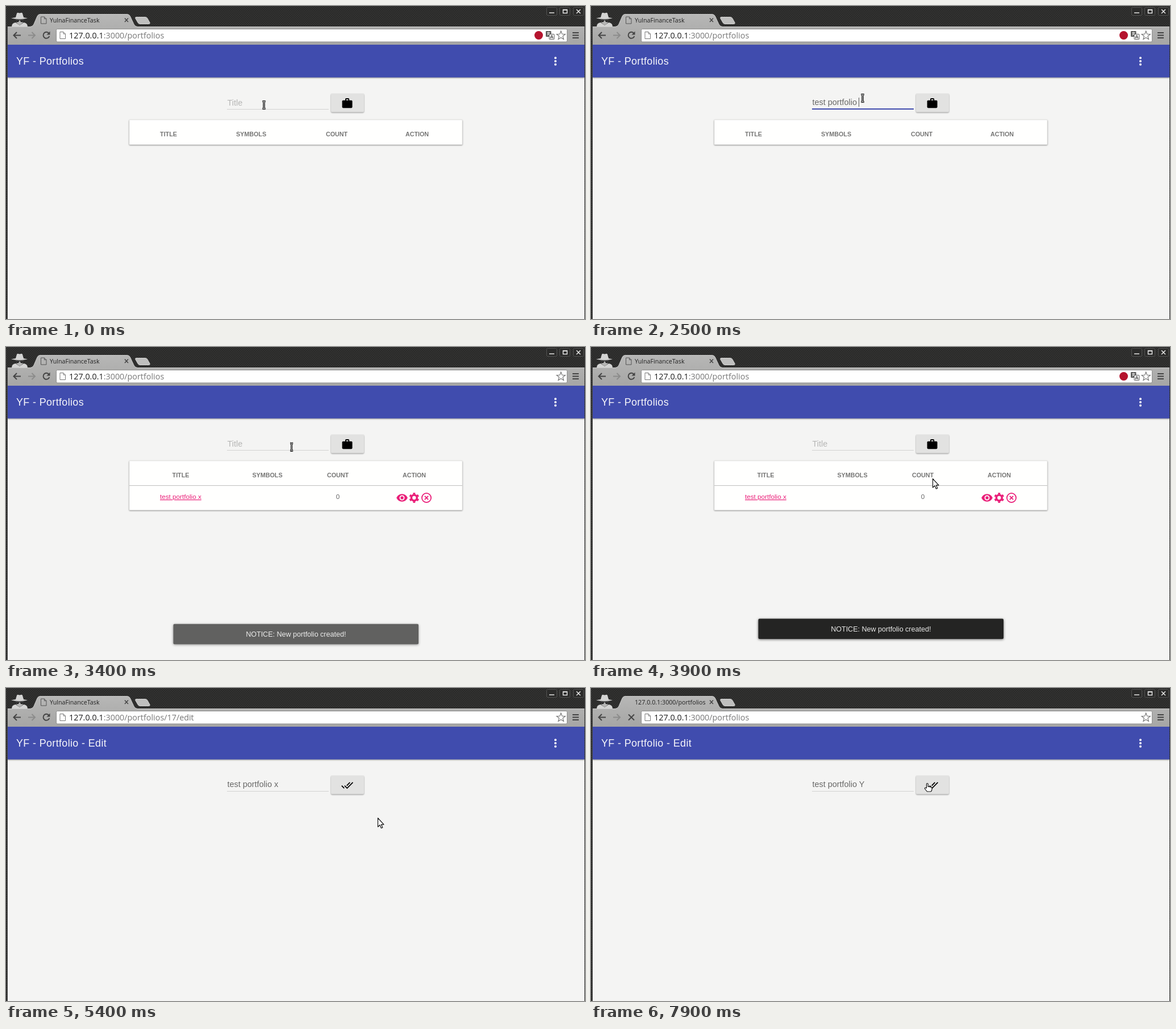
These frames come from a looping animation (1019x550 px, 8000 ms). An HTML page:

```html
<!DOCTYPE html>
<html lang="en">
<head>
<meta charset="utf-8">
<title>Portfolios</title>
<style>
  html, body { margin: 0; width: 100%; height: 100%; overflow: hidden; background: #f4f4f3; }
  svg { display: block; width: 100%; height: 100%; }
  text { font-family: "Liberation Sans", Arial, sans-serif; white-space: pre; }
  .ui { font-family: "Open Sans", "Noto Sans", sans-serif; }
  .th { font-size: 10.76px; font-weight: bold; fill: #757574; text-anchor: middle; }
  .card { filter: drop-shadow(0 1px 1px #0006); }
  .line { fill: none; stroke: #444; stroke-width: 2; }
  .pink { fill: #ea2079; stroke: #ea2079; }
</style>
</head>
<body>
<svg viewBox="0 0 1019 550" preserveAspectRatio="none">
  <defs>
    <pattern id="weave" width="4" height="4" patternUnits="userSpaceOnUse">
      <path fill="#2b2b2a" d="M0 0h4v4H0z"/>
      <path fill="#383837" d="M0 0h2v1H0zM2 2h2v1H2z"/>
    </pattern>
    <linearGradient id="metal" x2="0" y2="1">
      <stop stop-color="#b7b7b6"/><stop offset="1" stop-color="#a6a6a5"/>
    </linearGradient>
    <linearGradient id="fade" gradientUnits="userSpaceOnUse" x1="188" x2="203" y1="0" y2="0">
      <stop stop-color="#222"/><stop offset="1" stop-color="#222" stop-opacity="0"/>
    </linearGradient>
    <path id="doc" d="M.5.5h6l3.5 3.5v8.5H.5zM6.5.5V4H10" fill="none" stroke-width="1"/>
    <clipPath id="page"><path d="M3 68h1015v482H3z"/></clipPath>
  </defs>

  <!-- window frame -->
  <path fill="url(#weave)" d="M0 0h1019v550H0z"/>
  <path fill="#4a4a49" d="M2 36h1v514H2z"/>
  <g fill="#2b2b2a" stroke="#545453">
    <rect x="951.5" y="2.5" width="18" height="14" rx="2"/>
    <rect x="974.5" y="2.5" width="18" height="14" rx="2"/>
    <rect x="998.5" y="2.5" width="18" height="14" rx="2"/>
  </g>
  <path d="M956 12h9M980.500 6.500h7v6h-7zM980 7h8M1004 6l7 7M1011 6l-7 7" fill="none" stroke="#e6e6e5" stroke-width="1.500"/>

  <!-- private-mode badge -->
  <g fill="#d4d4d3">
    <path d="M17 20l2-7q1-2 3-1l2 .6 2-.6q2-1 3 1l2 7z"/>
    <path d="M9 21.500q15-4 29 0q-14 3.500-29 0z"/>
    <path d="M10 36q0-6 7-7l7 5 7-5q7 1 7 7z"/>
    <path d="M17 24h14l-2 6-5 4-5-4z" fill="#b5b5b4"/>
  </g>
  <path d="M16.500 24.500h6.500v2q-3 4-6-.5zM25 24.500h6.500l-.5 1.500q-3 4.500-6 .5zM22 24.500h4v1h-4z" fill="#222"/>

  <!-- tabs and toolbar -->
  <path d="M3 68V36H43Q47 36 49 32L55 18Q56.500 14.500 60 14.500H213Q217 14.500 218.500 18L225 32Q227 36 231 36H1018V68z" fill="url(#metal)"/>
  <path d="M3 36.500H43Q47 36 49 32L55 18Q56.500 14.500 60 14.500H213Q217 14.500 218.500 18L225 32Q227 36 231 36.500H1018" fill="none" stroke="#cacac9"/>
  <path d="M229 19.500h16q3 0 4 2.500l4 7q1 2.500-2 2.500h-15q-3 0-4-2.500l-4-7q-1-2.500 1-2.500z" fill="#bfbfbe" stroke="#d3d3d2"/>
  <path d="M209 21.500l6 6.500M215 21.500l-6 6.500" class="line" style="stroke-width:1.500"/>
  <use id="favicon" href="#doc" x="61" y="18.500" stroke="#555"/>
  <text id="tabTitle" class="ui" x="77" y="29" font-size="10.7"></text>
  <g class="line">
    <path d="M26 51.500H14M19 46l-5.500 5.500L19 57"/>
    <path d="M39 51.500h12M45.500 46l5.500 5.500L45.500 57" stroke="#8c8c8b"/>
    <g id="reload"><path d="M75.500 48A5.500 5.500 0 1 0 76.300 53"/><path d="M77.500 44.500v6h-6z" fill="#444" stroke="none"/></g>
    <path id="stop" d="M66 46.500l10 10M76 46.500l-10 10"/>
    <path d="M997 47h11M997 51.500h11M997 56h11"/>
  </g>
  <rect x="88.500" y="40.500" width="899" height="22.500" rx="2" fill="#fff" stroke="#8d8d8c"/>
  <use href="#doc" x="94.500" y="45" stroke="#777"/>
  <text class="ui" x="111" y="56.500" font-size="14.350" fill="#777"><tspan fill="#1c1c1c">127.0.0.1</tspan><tspan id="path"></tspan></text>
  <g id="extensions">
    <circle cx="937.500" cy="51.500" r="7.500" fill="#b5142e"/>
    <rect x="950" y="44" width="9.500" height="10" rx="1" fill="#595958"/>
    <path d="M952 47h5.500M954.700 45.500V47M956.500 47q-1 3-4.500 4.500M953 47.500q1 3 4 4" fill="none" stroke="#fff"/>
    <rect x="956" y="49.500" width="9" height="9" rx="1" fill="#eee" stroke="#666"/>
    <path d="M958 57l2.500-6 2.500 6M959 55h3" fill="none" stroke="#444"/>
  </g>
  <path id="star" fill="#fff" stroke="#777" stroke-width="1.200"/>

  <!-- page -->
  <g clip-path="url(#page)">
    <path fill="#f4f4f3" d="M3 68h1015v482H3z"/>
    <path fill="#404cae" d="M3 68h1015v57.500H3z" class="card"/>
    <text id="heading" x="18" y="103" font-size="17.940" letter-spacing=".36" fill="#f6f6fa"></text>
    <g fill="#fff"><circle cx="967" cy="91.300" r="2"/><circle cx="967" cy="97" r="2"/><circle cx="967" cy="102.700" r="2"/></g>

    <path d="M389 181.500h179" stroke="#d2d2d1"/>
    <rect id="focusLine" y="180" height="2" fill="#404cae"/>
    <text id="label" x="389.500" y="175" font-size="14.400" fill="#b5b5b4">Title</text>
    <text id="value" x="389.500" y="174" font-size="14.400" fill="#686867"></text>
    <path id="caret" d="M0 161v16" stroke="#555"/>
    <rect class="card" x="572" y="154" width="58" height="32.500" rx="2" fill="#e2e2e1"/>
    <g transform="translate(589.800 160.300) scale(.897)">
      <path id="work" d="M20 6h-4V4c0-1.110-.89-2-2-2h-4c-1.110 0-2 .89-2 2v2H4c-1.110 0-2 .89-2 2v11c0 1.110.89 2 2 2h16c1.110 0 2-.89 2-2V8c0-1.110-.89-2-2-2zm-6 0h-4V4h4v2z"/>
      <path id="done" d="M1.100 12.700L6 17.600M6.800 12.700l4.900 4.900L23 6.300M17.300 6.300L11 12.600" fill="none" stroke="#000" stroke-width="2"/>
    </g>

    <g id="table">
      <rect id="card" class="card" x="217" y="200" width="586" rx="1" fill="#fffffe" stroke="#e2e2e1" stroke-width=".8"/>
      <g id="heads"></g>
      <g id="row">
        <path id="hover" d="M217.500 244h585v42h-585z" fill="#eeeeed"/>
        <path d="M217 243.500h586" stroke="#c0c0bf"/>
        <text x="271" y="267" font-size="11.700" class="pink" stroke-width="0" text-decoration="underline">test portfolio x</text>
        <text x="584" y="267" font-size="11.700" fill="#666" text-anchor="middle">0</text>
        <g class="pink" transform="translate(697 265) scale(.897)">
          <path d="M-11 0Q-7.500-7.500 0-7.500T11 0Q7.500 7.500 0 7.500T-11 0zM-5 0a5 5 0 0 0 10 0a5 5 0 0 0-10 0z" fill-rule="evenodd" stroke="none"/>
          <circle r="3" stroke="none"/>
        </g>
        <g class="pink" transform="translate(718.300 265) scale(.897)" style="fill:none">
          <circle r="5.500" stroke-width="4"/>
          <circle r="8.400" stroke-width="3" pathLength="6" stroke-dasharray=".5" stroke-dashoffset="-.25"/>
        </g>
        <g class="pink" transform="translate(740 265) scale(.897)" style="fill:none" stroke-width="2">
          <circle r="9"/><path d="M-3.500-3.500l7 7M3.500-3.500l-7 7"/>
        </g>
      </g>
    </g>

    <g id="toast">
      <rect x="294.500" y="477.500" width="431.500" height="35.500" rx="2" fill="#242423" style="filter:drop-shadow(0 1px 2px #0009)"/>
      <text x="510.300" y="500" font-size="12.540" fill="#e9e9e8" text-anchor="middle">NOTICE: New portfolio created!</text>
    </g>
    <g id="status">
      <path d="M3 530h334q3 0 3 3v17H3z" fill="#dcdcdb"/>
      <text class="ui" x="6.500" y="543.500" font-size="10.700" fill="#666">127.0.0.1:3000/portfolios/17/edit</text>
    </g>
  </g>

  <g id="pointer" stroke-linejoin="round">
    <g id="beam" fill="none">
      <path id="beamShape" d="M-2.500-6.500h1.500l1 .8 1-.8h1.500M0-6v12M-2.500 6.500h1.500l1-.8 1 .8h1.500" stroke="#111" stroke-width="3"/>
      <use href="#beamShape" style="stroke:#fff"/>
      <path d="M-2.500-6.500h1.500l1 .8 1-.8h1.500M0-6v12M-2.500 6.500h1.500l1-.8 1 .8h1.500" stroke="#fff" stroke-width=".9"/>
    </g>
    <path id="arrow" d="M.5.500v15.500l3.500-3.300 2.400 5.500 2.400-1-2.400-5.400h4.600z" fill="#fff" stroke="#111" stroke-width="1.200"/>
    <path id="hand" d="M-1.500 8V1q0-1.500 1.300-1.500T1.200 1v4.500q1.500-1 2.300.3 1.500-.8 2.200.4 2-.5 2.300 1.300V10q0 3-2 4H-.5l-4-5q-.5-2 1.300-1.700z" fill="#fff" stroke="#111" stroke-width="1.200"/>
  </g>
</svg>

<script>
const LOOP = 8000;
const $ = id => document.getElementById(id);
const show = (id, on) => { $(id).style.display = on ? '' : 'none'; };
const within = (t, from, to) => t >= from && t < to;
const progress = (t, from, ms) => Math.min(1, Math.max(0, (t - from) / ms));
const easeOut = p => 1 - (1 - p) ** 3;

const HEADS = ['TITLE', 'SYMBOLS', 'COUNT', 'ACTION'];
const EMPTY_COLUMNS = [286, 431.5, 582, 723.5];
const FILLED_COLUMNS = [307.5, 460, 584, 718.5];

// Times at which each character of the title is on screen.
const TITLE = 'test portfolio x';
const KEY_TIMES = [700, 800, 900, 1000, 1100, 1200, 1400, 1500, 1600,
  1800, 1800, 2000, 2200, 2300, 2500, 2700];

// Pointer stops: time, x, y.
const POINTER = [
  [0, 454, 174], [500, 478, 162], [3300, 478, 162], [3800, 601, 231],
  [3900, 601, 231], [4500, 718, 264], [5200, 718, 264], [5700, 558, 174],
  [5900, 542, 166], [7200, 542, 166], [7600, 592, 168], [LOOP, 592, 168]
];

$('heads').innerHTML = HEADS.map(h => `<text class="th" y="228.500">${h}</text>`).join('');
$('star').setAttribute('d', 'M' + Array.from({ length: 10 }, (_, i) => {
  const r = i % 2 ? 3.4 : 8, a = Math.PI * (i / 5 - .5);
  return [976.7 + r * Math.cos(a), 52 + r * Math.sin(a)];
}).join('L') + 'z');

function pointerAt(t) {
  const i = POINTER.findIndex(stop => stop[0] > t);
  const [t0, x0, y0] = POINTER[i - 1], [t1, x1, y1] = POINTER[i];
  const p = progress(t, t0, t1 - t0);
  return [x0 + (x1 - x0) * p, y0 + (y1 - y0) * p];
}

function fieldText(t) {
  if (t < 3100) return TITLE.slice(0, KEY_TIMES.filter(k => k <= t).length);
  if (t < 5200) return '';
  return 'test portfolio ' + (t < 6700 ? 'x' : t < 7100 ? '' : 'Y');
}

function drawBrowser(t, editing) {
  const busy = within(t, 2900, 3100) || within(t, 4900, 5200) || t >= 7800;
  const path = ':3000/portfolios' + (within(t, 4900, 7800) ? '/17/edit' : '');
  $('path').textContent = path;
  $('tabTitle').textContent = !busy ? 'YulnaFinanceTask'
    : '127.0.0.1:3000/portfolios' + (editing || t < 4900 ? '' : '/');
  $('tabTitle').setAttribute('fill', within(t, 4900, 5200) ? 'url(#fade)' : '#222');
  show('favicon', !busy);
  show('reload', !busy);
  show('stop', busy);
  show('extensions', !(within(t, 3100, 3600) || within(t, 4900, 5500) || t >= 7800));
}

function drawField(t, editing) {
  const text = fieldText(t);
  $('value').textContent = text;
  show('label', !text);
  show('work', !editing);
  show('done', editing);

  const grow = t < 3100 ? progress(t, 200, 200)
    : progress(t, 5900, 200) - progress(t, 7600, 200);
  $('focusLine').setAttribute('x', 389 + 89.5 * (1 - grow));
  $('focusLine').setAttribute('width', 179 * grow);

  show('caret', within(t, 300, 2900) || within(t, 6700, 7600));
  const end = text ? $('value').getComputedTextLength() : 0;
  $('caret').setAttribute('transform', `translate(${Math.round(389 + end) + .5} 0)`);
}

function drawTable(t, editing, y) {
  const filled = t >= 3100;
  show('table', !editing);
  show('row', filled);
  show('hover', t > 3900 && y > 244);
  $('card').setAttribute('height', filled ? 86.5 : 43.5);
  const columns = filled ? FILLED_COLUMNS : EMPTY_COLUMNS;
  [...$('heads').children].forEach((head, i) => head.setAttribute('x', columns[i]));
}

function drawPointer(t, editing, x, y) {
  const overField = x < 569 && within(y, 155, 187);
  const overLink = within(t, 4500, 4900) || (t > 7200 && x > 572);
  show('beam', overField);
  show('hand', overLink);
  show('arrow', !overField && !overLink);
  $('pointer').setAttribute('transform', `translate(${x} ${y})`);
}

function draw() {
  const t = Math.floor(performance.now() % LOOP / 100) * 100;
  const editing = t >= 5200;
  const [x, y] = pointerAt(t);
  $('heading').textContent = editing ? 'YF - Portfolio - Edit' : 'YF - Portfolios';
  drawBrowser(t, editing);
  drawField(t, editing);
  drawTable(t, editing, y);
  drawPointer(t, editing, x, y);

  const rise = easeOut(progress(t, 3300, 300));
  show('toast', t > 3300 && !editing);
  $('toast').setAttribute('opacity', rise);
  $('toast').setAttribute('transform', `translate(0 ${31 * (1 - rise)})`);
  show('status', within(t, 4500, 5200));
  requestAnimationFrame(draw);
}
draw();
</script>
</body>
</html>
```
